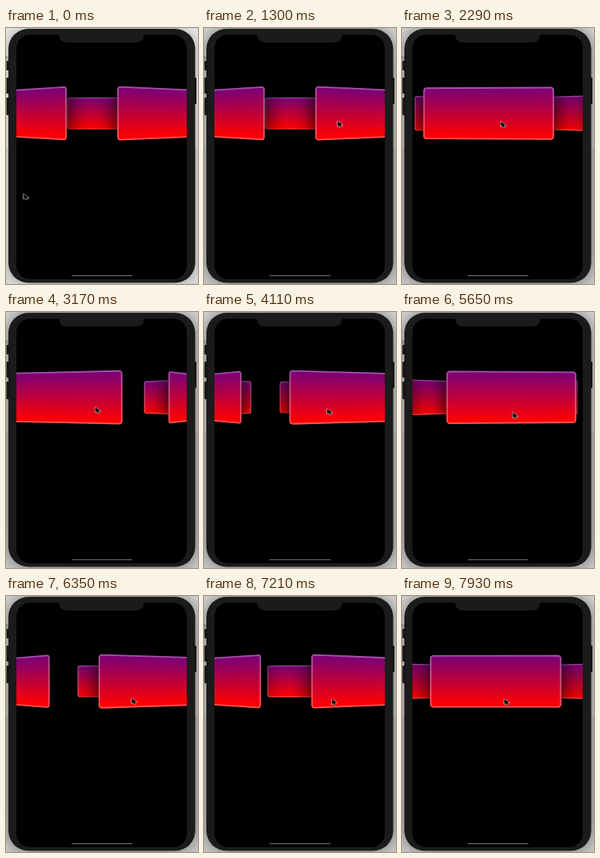
Write an HTML page with a canvas that moves like this. It is 240 px wide and 320 px high and loops after 8000 ms.

```html
<!DOCTYPE html>
<html lang="en">
<head>
<meta charset="utf-8">
<title>Card carousel</title>
<style>
  html, body { margin: 0; width: 100%; height: 100%; overflow: hidden; background: #d9d9d9; }
  canvas { display: block; width: 240px; height: 320px; }
</style>
</head>
<body>
<canvas id="stage" width="240" height="320"></canvas>
<script>
const ctx = document.getElementById('stage').getContext('2d');
const LOOP = 8000;
const CENTER = { x: 119.5, y: 106.7 };
const CARD = { count: 5, width: 124.3, height: 49.6, corner: 3.2, radius: 125 };
const PERSPECTIVE = 512;
const RAD = Math.PI / 180;
const BEZEL = '#1b1b1b';

// Pointer roams over the resting cards, then drags them to and fro:
// step, carousel angle in degrees, pointer x, pointer y
const POSES = [
  [-40, 32.3, 161, 76],
  [-32, 32.3, 14, 104],
  [-23, 32.3, 205, 130],
  [-15, 32.3, 163, 116],
  [6, -4.2, 123.5, 117],
  [26, -18.6, 111.5, 119],
  [45, 22.6, 154, 121],
  [60, 45, 174, 122],
  [65, 43.2, 170.5, 123],
  [79, 6, 138, 126],
  [93, 25.3, 157, 128],
  [104, 40, 169, 129],
  [128, -0.9, 128, 129],
  [132, -3, 126, 129]
];

// Steps come in threes, held for 20, 20 and 100 ms.
function stepAt(time) {
  if (time < 320) return -40;
  const cycle = Math.floor((time - 2010) / 140);
  const phase = time - 2010 - cycle * 140;
  return cycle * 3 + (phase < 20 ? 0 : phase < 40 ? 1 : 2);
}

function slope(i, j) {
  return (POSES[i + 1][j] - POSES[i][j]) / (POSES[i + 1][0] - POSES[i][0]);
}

function tangent(i, j) {
  if (i === 0 || i === POSES.length - 1) return 0;
  const before = slope(i - 1, j), after = slope(i, j);
  return before * after <= 0 ? 0 : 2 * before * after / (before + after);
}

// Monotone cubic interpolation, so the drag turns only at the poses.
function poseAt(step) {
  let i = 0;
  while (i < POSES.length - 2 && step > POSES[i + 1][0]) i++;
  const a = POSES[i], b = POSES[i + 1], span = b[0] - a[0];
  const u = (step - a[0]) / span, v = 1 - u;
  return [1, 2, 3].map(j =>
    a[j] * (1 + 2 * u) * v * v + b[j] * u * u * (3 - 2 * u) +
    span * u * v * (tangent(i, j) * v - tangent(i + 1, j) * u));
}

function project(angle, x, y) {
  const sin = Math.sin(angle), cos = Math.cos(angle);
  const depth = CARD.radius * cos - x * sin;
  const scale = PERSPECTIVE / (PERSPECTIVE - depth);
  return {
    x: CENTER.x + (CARD.radius * sin + x * cos) * scale,
    y: CENTER.y + y * scale,
    scale
  };
}

function cardPath(angle) {
  const path = new Path2D();
  const r = CARD.corner, w = CARD.width / 2 - r, h = CARD.height / 2 - r;
  [[1, 1], [-1, 1], [-1, -1], [1, -1]].forEach(([sx, sy], corner) => {
    for (let k = 0; k <= 4; k++) {
      const turn = (corner + k / 4) * Math.PI / 2;
      const p = project(angle, sx * w + r * Math.cos(turn), sy * h + r * Math.sin(turn));
      path.lineTo(p.x, p.y);
    }
  });
  path.closePath();
  return path;
}

const cardFill = ctx.createLinearGradient(0, -0.5, 0, 0.5);
cardFill.addColorStop(0, '#76007a');
cardFill.addColorStop(0.9, '#f80008');
cardFill.addColorStop(1, '#ff0000');

function drawCard(angle) {
  const path = cardPath(angle);
  ctx.save();
  ctx.shadowColor = '#000';
  ctx.shadowBlur = 28;
  ctx.fillStyle = '#000';
  ctx.fill(path);
  ctx.restore();

  ctx.save();
  ctx.clip(path);
  const a = project(angle, -CARD.width / 2, 0), b = project(angle, CARD.width / 2, 0);
  const from = Math.max(12, Math.floor(Math.min(a.x, b.x)));
  const to = Math.min(228, Math.max(a.x, b.x));
  ctx.fillStyle = cardFill;
  for (let x = from; x < to; x++) {
    const scale = a.scale + (b.scale - a.scale) * (x - a.x) / (b.x - a.x);
    ctx.save();
    ctx.translate(x, CENTER.y);
    ctx.scale(1, CARD.height * scale);
    ctx.fillRect(0, -0.6, 1, 1.2);
    ctx.restore();
  }
  ctx.strokeStyle = 'rgba(255,255,255,.32)';
  ctx.lineWidth = 2.8 * (a.scale + b.scale) / 2;
  ctx.stroke(path);
  ctx.restore();
}

function drawCarousel(degrees) {
  const angles = Array.from({ length: CARD.count }, (_, i) => (degrees + i * 360 / CARD.count) * RAD);
  angles.sort((a, b) => Math.cos(a) - Math.cos(b)).forEach(drawCard);
}

function roundRect(x, y, w, h, r, color) {
  ctx.beginPath();
  ctx.roundRect(x, y, w, h, r);
  ctx.fillStyle = color;
  ctx.fill();
}

// The window casts a deeper shadow once it has been clicked.
function drawPhone(active) {
  ctx.fillStyle = '#e2e2e2';
  ctx.fillRect(0, 0, 240, 320);
  ctx.fillStyle = '#d6d6d6';
  ctx.fillRect(0, 150, 240, 170);
  ctx.save();
  ctx.shadowColor = active ? 'rgba(0,0,0,.6)' : 'rgba(0,0,0,.25)';
  ctx.shadowBlur = active ? 28 : 12;
  roundRect(3, 1, 233.5, 317.5, 25, BEZEL);
  ctx.restore();
  ctx.fillStyle = '#555';
  ctx.font = '6px Inter, sans-serif';
  ctx.fillText('h', 0, 40);
  [[41, 12], [62, 20], [87, 22]].forEach(([y, h]) => roundRect(0.5, y, 4, h, 1, '#151515'));
  roundRect(235, 62, 3, 33, 1, '#151515');
  roundRect(13, 8.5, 213, 305.5, 17, '#000');
}

function drawOverlays() {
  ctx.beginPath();
  ctx.moveTo(64, 8);
  ctx.quadraticCurveTo(67, 8.5, 67, 11);
  ctx.quadraticCurveTo(67.5, 18, 76, 18);
  ctx.lineTo(163, 18);
  ctx.quadraticCurveTo(171.5, 18, 172, 11);
  ctx.quadraticCurveTo(172, 8.5, 175, 8);
  ctx.fillStyle = BEZEL;
  ctx.fill();
  roundRect(82, 309, 76, 1.3, 0.6, '#626262');
}

function drawPointer(x, y) {
  ctx.save();
  ctx.translate(x, y);
  ctx.scale(1.2, 0.9);
  ctx.beginPath();
  [[0, 0], [0, 7], [1.6, 5.7], [2.8, 8.2], [4.2, 7.6], [3.2, 5.2], [5.4, 5]].forEach(p => ctx.lineTo(...p));
  ctx.closePath();
  ctx.fillStyle = '#000';
  ctx.strokeStyle = '#ddd';
  ctx.lineJoin = 'round';
  ctx.stroke();
  ctx.fill();
  ctx.restore();
}

function draw(time) {
  const [degrees, x, y] = poseAt(stepAt(time));
  drawPhone(time >= 1300);
  ctx.save();
  ctx.beginPath();
  ctx.rect(13, 8.5, 213, 305.5);
  ctx.clip();
  drawCarousel(degrees);
  ctx.restore();
  drawOverlays();
  if (time < 180) drawPointer(22, 207.5);
  else drawPointer(x, y);
}

const start = performance.now();
function tick() {
  draw((performance.now() - start) % LOOP);
  requestAnimationFrame(tick);
}
tick();
</script>
</body>
</html>
```
